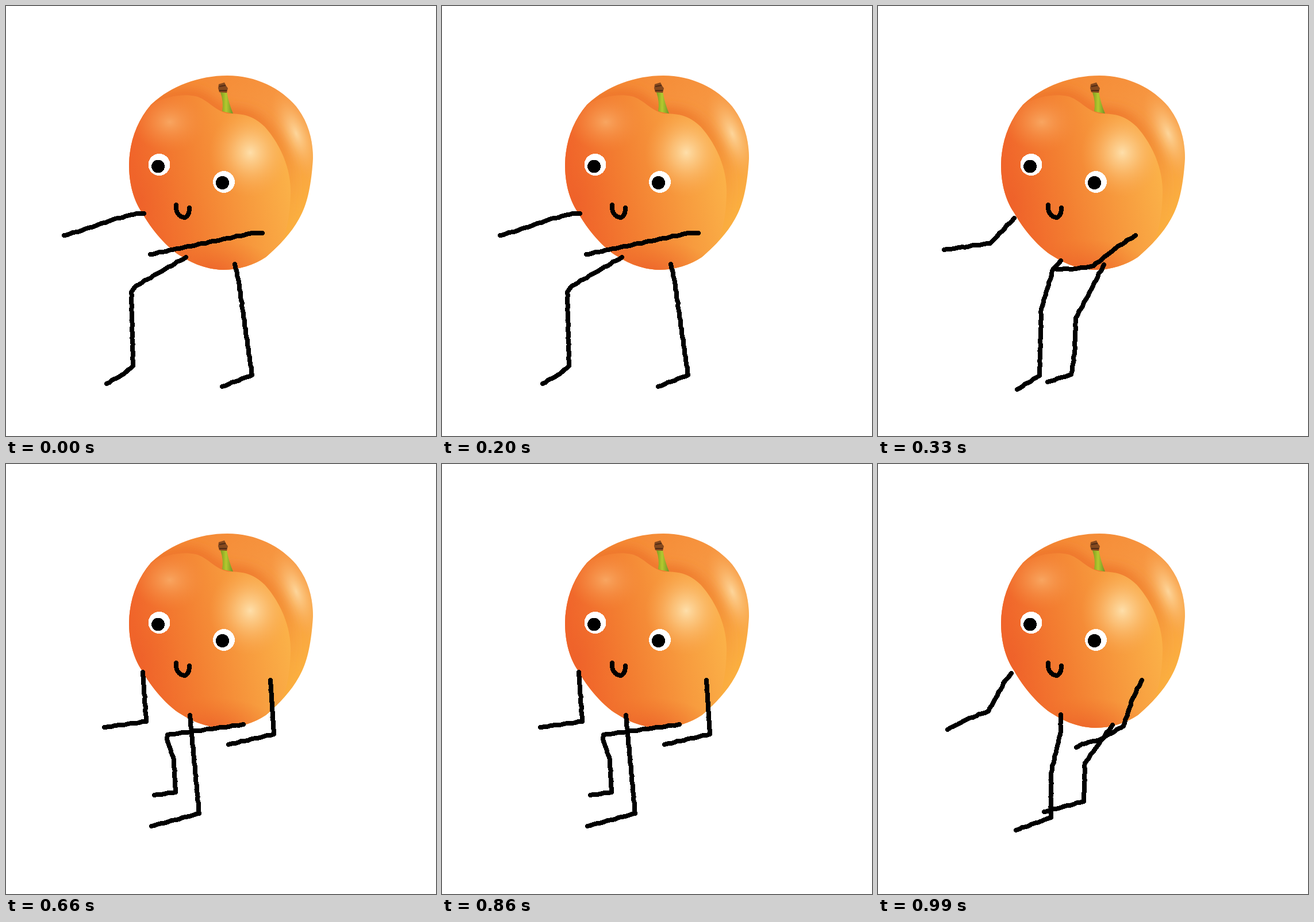
These frames come from a looping animation (748x748 px, 1320 ms). An HTML page:

```html
<!DOCTYPE html>
<html lang="en">
<head>
<meta charset="utf-8">
<title>Dancing apricot</title>
<style>
  html, body { margin: 0; width: 100%; height: 100%; overflow: hidden; background: #fff; }
  svg { display: block; width: 100vw; height: 100vh; }
  .line { fill: none; stroke: #000; stroke-width: 8; stroke-linecap: round; stroke-linejoin: round; shape-rendering: crispEdges; }
  .eyes { shape-rendering: crispEdges; }
</style>
</head>
<body>
<svg viewBox="0 0 748 748">
  <defs>
    <path id="body" d="M385 121C435 121 478 143 505 175C527 203 534 235 534 265C532 300 527 335 515 360C500 392 478 414 452 437C432 450 405 459 378 459C345 458 318 445 295 429C268 408 248 380 237 360C220 335 214 305 214 275C215 235 228 200 252 172C285 140 335 121 385 121Z"/>
    <path id="lobe" d="M240 180C270 157 305 152 330 157C350 162 362 181 385 187C400 188 425 185 450 210C475 238 496 280 495 325C494 370 487 405 470 425L400 470H200V200Z"/>
    <clipPath id="inBody"><use href="#body"/></clipPath>
    <clipPath id="inLobe"><use href="#lobe"/></clipPath>
    <filter id="soft" x="-20%" y="-20%" width="140%" height="140%"><feGaussianBlur stdDeviation="9"/></filter>
    <g id="units"></g>
    <linearGradient id="back" gradientUnits="userSpaceOnUse" x1="330" y1="130" x2="505" y2="370">
      <stop offset="0" stop-color="#f58b36"/>
      <stop offset=".5" stop-color="#f79a45"/>
      <stop offset="1" stop-color="#fbb040"/>
    </linearGradient>
    <linearGradient id="front" gradientUnits="userSpaceOnUse" x1="235" y1="355" x2="492" y2="300">
      <stop offset="0" stop-color="#f0632a"/>
      <stop offset=".35" stop-color="#f37e31"/>
      <stop offset=".7" stop-color="#f79b3e"/>
      <stop offset="1" stop-color="#fbb148"/>
    </linearGradient>
    <linearGradient id="crease" gradientUnits="userSpaceOnUse" x1="400" y1="185" x2="490" y2="350">
      <stop offset="0" stop-color="#ee752a"/>
      <stop offset=".5" stop-color="#f18a30" stop-opacity=".8"/>
      <stop offset="1" stop-color="#f79e38" stop-opacity=".25"/>
    </linearGradient>
    <radialGradient id="shine">
      <stop offset="0" stop-color="#fedfaa"/>
      <stop offset=".35" stop-color="#fcc985" stop-opacity=".75"/>
      <stop offset="1" stop-color="#f9a650" stop-opacity="0"/>
    </radialGradient>
    <radialGradient id="glow">
      <stop offset="0" stop-color="#f9aa66" stop-opacity=".9"/>
      <stop offset="1" stop-color="#f58c3c" stop-opacity="0"/>
    </radialGradient>
    <radialGradient id="shade">
      <stop offset="0" stop-color="#ec602a" stop-opacity=".9"/>
      <stop offset="1" stop-color="#f0702a" stop-opacity="0"/>
    </radialGradient>
    <linearGradient id="stem">
      <stop offset="0" stop-color="#7e9a20"/>
      <stop offset=".45" stop-color="#b4c92f"/>
      <stop offset="1" stop-color="#6f9326"/>
    </linearGradient>
  </defs>

  <use href="#body" fill="url(#back)"/>
  <g clip-path="url(#inBody)">
    <ellipse cx="505" cy="222" rx="36" ry="85" transform="rotate(-22 505 222)" fill="url(#shine)" opacity=".85"/>
    <use href="#lobe" fill="none" stroke="url(#crease)" stroke-width="22" filter="url(#soft)"/>
    <use href="#lobe" fill="url(#front)"/>
    <g clip-path="url(#inLobe)">
      <ellipse cx="285" cy="202" rx="65" ry="52" fill="url(#glow)"/>
      <ellipse cx="425" cy="255" rx="72" ry="78" fill="url(#shine)"/>
      <ellipse cx="355" cy="465" rx="125" ry="60" fill="url(#shade)"/>
      <ellipse cx="235" cy="335" rx="65" ry="90" fill="url(#shade)" opacity=".45"/>
    </g>
  </g>

  <path d="M373 150L384 149Q387 168 395 187Q387 186 376 183Q379 168 373 150Z" fill="url(#stem)"/>
  <path d="M370 136L380 133L383 139L386 143L384 151L371 150L369 143Z" fill="#85491f"/>
  <path d="M371 140L382 138M371 147L384 147" stroke="#522b16" stroke-width="2"/>

  <g class="eyes">
    <g fill="#fff"><circle cx="266.5" cy="276" r="19"/><circle cx="379" cy="306" r="19"/></g>
    <circle cx="264.5" cy="279" r="11.5"/><circle cx="376.5" cy="307.5" r="11.5"/>
  </g>
  <path class="line" d="M296 346C295 359 301 367 311 368C317 366 319 360 319 351"/>
  <path class="line" id="limbs"/>
</svg>
<script>
// Each pose: left arm, right arm, two legs.
const poses = [
  ["101,399 133,390 185,372 227,361 240,361",
   "251,432 290,424 430,395 446,395",
   "313,437 226,487 218,498 221,626 205,640 175,657",
   "398,449 404,475 428,642 376,662"],
  ["237,369 195,413 115,424",
   "448,399 415,420 375,452 345,457 311,458",
   "318,443 305,457 284,527 281,643 242,667",
   "393,450 362,510 344,543 342,605 336,641 295,654"],
  ["238,362 244,448 171,458",
   "460,376 466,470 387,488",
   "413,453 281,471 280,478 292,515 295,571 258,576",
   "320,437 336,608 253,630"],
  ["232,364 222,376 192,430 155,444 121,462",
   "459,376 443,408 427,456 385,480 355,487 345,493",
   "318,436 318,465 301,538 301,615 240,637",
   "408,454 360,520 358,587 289,605"]
];
const HOLD = 330;

// Turns a limb into a slightly shaky hand-drawn line.
function shaky(limb) {
  const pts = limb.split(" ").map(p => p.split(",").map(Number));
  const out = [pts[0]];
  let n = 0;
  for (let i = 1; i < pts.length; i++) {
    const [ax, ay] = pts[i - 1], [bx, by] = pts[i];
    const steps = Math.max(1, Math.round(Math.hypot(bx - ax, by - ay) / 6));
    for (let s = 1; s < steps; s++, n++) {
      const k = s / steps;
      out.push([ax + (bx - ax) * k + 0.7 * Math.sin(n * 2.3),
                ay + (by - ay) * k + 0.7 * Math.cos(n * 1.7)]);
    }
    out.push([bx, by]);
  }
  return "M" + out.map(p => p.map(v => v.toFixed(1)).join(" ")).join("L");
}

const paths = poses.map(pose => pose.map(shaky).join(""));
const limbs = document.getElementById("limbs");

function draw() {
  limbs.setAttribute("d", paths[Math.floor(performance.now() / HOLD) % paths.length]);
  requestAnimationFrame(draw);
}
draw();
</script>
</body>
</html>
```
